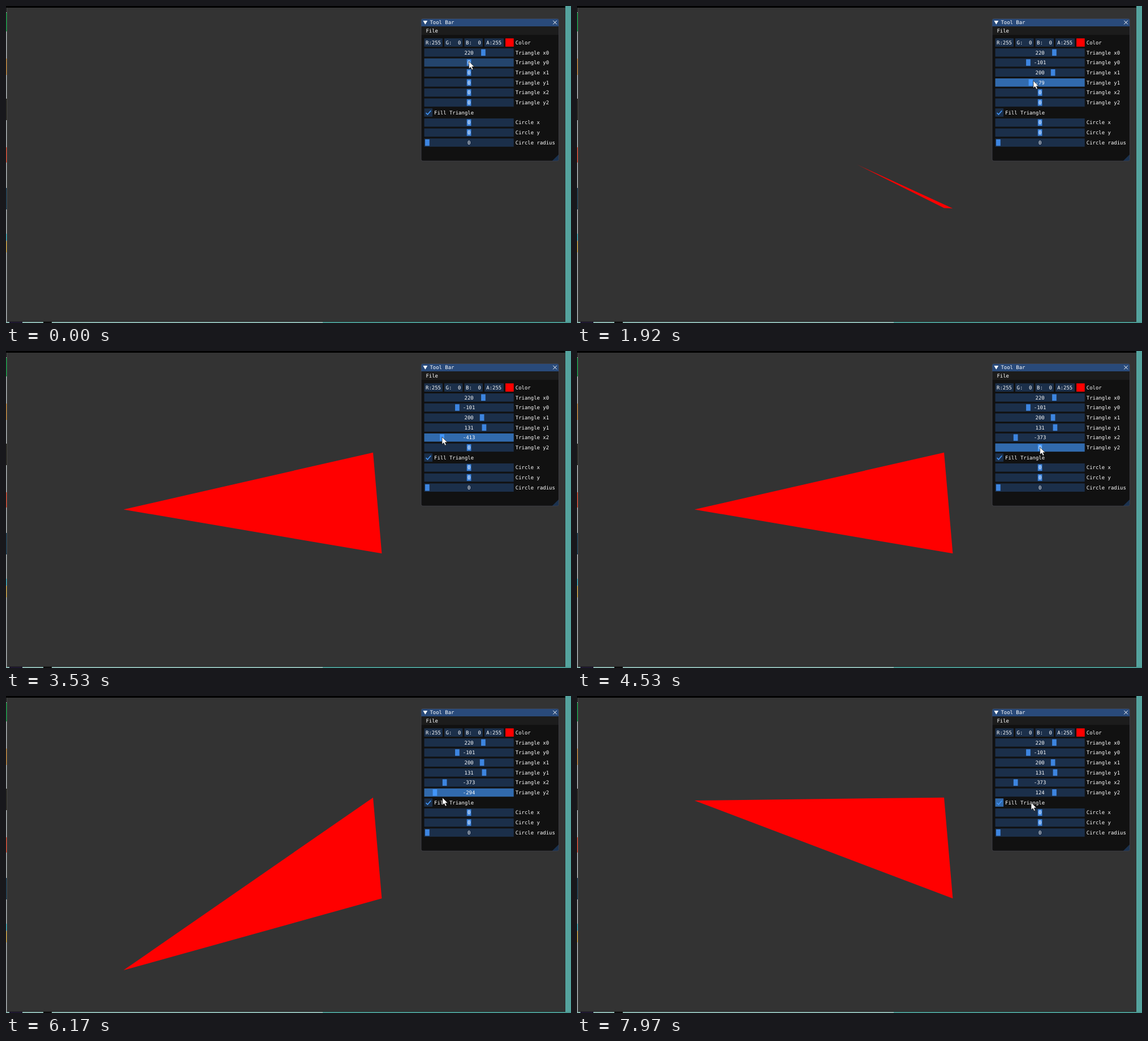
These frames come from a looping animation (999x561 px, 8000 ms). An HTML page:

```html
<!DOCTYPE html>
<html lang="en">
<head>
<meta charset="utf-8">
<title>Triangle tool bar</title>
<style>
  html, body { margin: 0; width: 100%; height: 100%; overflow: hidden; background: #333; }
  svg { display: block; width: 100%; height: 100%; }
  text {
    font: 8.96px "DejaVu Sans Mono", monospace;
    fill: #fff;
    white-space: pre;
    text-rendering: geometricPrecision;
  }
  .mid { text-anchor: middle; }
</style>
</head>
<body>
<svg id="stage" viewBox="0 0 999 561" preserveAspectRatio="none"></svg>
<script>
const LOOP = 8000, LAG = 30, UNIT = 0.77;
const CENTER = { x: 495, y: 280.5 };
const ROW = { left: 739.5, width: 158.2, height: 14.6, mid: 818.6, travel: 73.7 };
const COLOR = {
  idle: '#1b2f4a', hover: '#24456d', active: '#316aad',
  grab: '#3d85e0', grabActive: '#4296fa', red: '#ff0000'
};

// Pointer tracks: time, place
const TRACK_X = [
  [60, 818.6], [240, 797.9], [330, 797.9], [490, 818.6], [640, 818.6], [980, 836.2],
  [1040, 842.4], [1160, 841.6], [1290, 841.6], [1440, 818.6], [1500, 818.6],
  [1700, 786.3], [1800, 786.3], [1860, 797.9], [1920, 806.8], [2340, 845.4],
  [2590, 845.4], [2790, 818.6], [2900, 818.6], [3290, 790], [3470, 775.6], [3500, 771],
  [3850, 771], [3940, 775.6], [4100, 775.6], [4400, 818.6], [4710, 818.6],
  [5060, 850.1], [5290, 850.1], [5320, 842.3], [5350, 812], [5490, 800], [6080, 771],
  [6140, 757.9], [6170, 772], [6230, 757.8], [6260, 757.8], [6500, 815], [6660, 844],
  [7120, 844], [7400, 812], [7510, 800], [7820, 800], [7970, 803]
];
const TRACK_Y = [
  [0, 98], [330, 101], [490, 115], [1290, 117], [1440, 131], [2590, 134], [2790, 151],
  [4100, 153], [4400, 170], [5350, 172], [6140, 180], [7120, 177], [7400, 186], [7970, 188.5]
];

// Spans in which the moving picture stands still
const HOLDS = [[2270, 2340], [3350, 3530], [3530, 3620], [6690, 6870]];

// Press and release are the drag times
const SLIDERS = [
  { name: 'Triangle x0', max: 640, fixed: 220 },
  { name: 'Triangle y0', max: 360, press: 60, release: 330 },
  { name: 'Triangle x1', max: 640, press: 640, release: 1290 },
  { name: 'Triangle y1', max: 360, press: 1470, release: 2600 },
  { name: 'Triangle x2', max: 640, press: 2820, release: 4100 },
  { name: 'Triangle y2', max: 360, press: 4500, release: 7120 },
  { name: 'Circle x', max: 640, fixed: 0 },
  { name: 'Circle y', max: 360, fixed: 0 },
  { name: 'Circle radius', fixed: 0 }
];
const CHECK = { row: 7, press: 7820, release: LOOP };
SLIDERS.forEach((s, i) => s.row = i + (i < 6 ? 1 : 2));

const stage = document.getElementById('stage');

function add(tag, attrs, content) {
  const node = document.createElementNS('http://www.w3.org/2000/svg', tag);
  for (const key in attrs) node.setAttribute(key, attrs[key]);
  if (content !== undefined) node.textContent = content;
  stage.appendChild(node);
  return node;
}
const rect = (x, y, width, height, fill, more) => add('rect', { x, y, width, height, fill, ...more });
const shape = (d, fill, more) => add('path', { d, fill, ...more });
const label = (x, y, content) => add('text', { x, y }, content);
const centered = (x, y, content) => add('text', { x, y, class: 'mid' }, content);
const rowMid = row => 64.6 + 17.71 * row;

function drawDesktop() {
  rect(0, 0, 999, 561, '#55a39e');
  rect(0, 0, 2, 561, '#b4babd');
  const edge = (y, h, fill) => rect(0, y, 1.4, h, fill);
  edge(0, 11, '#111');
  edge(12, 33, '#00a33a');
  edge(93, 29, '#d08a30');
  edge(164, 38, '#14120a');
  edge(250, 27, '#ea4528');
  edge(322, 38, '#08304a');
  edge(403, 12, '#35bdd0');
  edge(416, 20, '#e2b03c');
  rect(0, 559, 999, 2, '#8fb9b3');
  rect(560, 559, 439, 2, '#4b9a93');
  rect(6, 559, 23, 2, '#1e1730');
  rect(66, 559, 15, 2, '#0c0c0c');
  rect(1.5, 0, 987.5, 559, '#222');
  rect(2, 3, 986.5, 555, '#333');
  rect(0, 0, 989, 3, '#000');
}

function drawPanel() {
  rect(734, 22.5, 243.5, 251.8, '#111', { rx: 3 });
  shape('M734 36V25.5Q734 22.5 737 22.5H974.5Q977.5 22.5 977.5 25.5V36Z', '#294a7a');
  rect(734, 36, 243.5, 15, '#1c1c1c');
  shape('M977.5 262.5V271.5Q977.5 274.3 974.5 274.3H965.5Z', '#1b324f');
  rect(734, 22.5, 243.5, 251.8, 'none', { rx: 3, stroke: '#45454c', 'stroke-width': 0.8 });
  shape('M737.4 26H745.2L741.3 32.8Z', '#fff');
  shape('M967.3 25.8L973.9 32.4M973.9 25.8L967.3 32.4', 'none', { stroke: '#fff', 'stroke-width': 1 });
  label(749.4, 32.4, 'Tool Bar');
  label(742.4, 47.2, 'File');

  const y = rowMid(0);
  ['R:255', 'G:  0', 'B:  0', 'A:255'].forEach((content, i) => {
    const x = ROW.left + 35.5 * i, w = i < 3 ? 32.4 : 34;
    rect(x, y - 7.3, w, ROW.height, COLOR.idle);
    centered(x + w / 2 - 0.2, y + 3.2, content);
  });
  rect(883.1, y - 7.3, 14.6, ROW.height, COLOR.red);
  label(900.8, y + 3.2, 'Color');
}

function drawRows() {
  for (const s of SLIDERS) {
    const y = rowMid(s.row);
    s.frame = rect(ROW.left, y - 7.3, ROW.width, ROW.height, COLOR.idle);
    s.grab = rect(0, y - 5.75, 7.7, 11.5, COLOR.grab);
    s.text = centered(ROW.mid, y + 3.2, '0');
    label(900.8, y + 3.2, s.name);
  }
  const y = rowMid(CHECK.row);
  CHECK.frame = rect(ROW.left, y - 7.3, 14.6, ROW.height, COLOR.idle);
  shape(`M742.6 ${y + 0.6}L745.4 ${y + 3.4}L751.3 ${y - 3.4}`, 'none',
    { stroke: COLOR.grabActive, 'stroke-width': 1.6 });
  label(757, y + 3.2, 'Fill Triangle');
}

function along(track, t) {
  let i = 1;
  while (i < track.length - 1 && track[i][0] < t) i++;
  const [t0, v0] = track[i - 1], [t1, v1] = track[i];
  const k = Math.min(1, Math.max(0, (t - t0) / (t1 - t0)));
  return v0 + (v1 - v0) * k;
}

function valueAt(s, t) {
  if (s.fixed !== undefined) return s.fixed;
  if (t < s.press) return 0;
  const x = along(TRACK_X, Math.min(t, s.release) - LAG);
  return Math.round((x - ROW.mid) / ROW.travel * s.max);
}

const isActive = (item, t) => t >= item.press && t < item.release;

function frameColor(item, t, tip, busy, right) {
  if (isActive(item, t)) return COLOR.active;
  const over = Math.abs(tip.y - rowMid(item.row)) < 7.3 && tip.x > ROW.left && tip.x < right;
  return over && !busy ? COLOR.hover : COLOR.idle;
}

drawDesktop();
const triangle = add('polygon', { fill: COLOR.red });
drawPanel();
drawRows();
const cursor = shape('M0 0V13L3 10.3L5.2 15L7.4 14L5.3 9.5H9.4Z', '#fff',
  { stroke: '#111', 'stroke-width': 0.7 });

function render(time) {
  const hold = HOLDS.find(([from, to]) => time >= from && time < to);
  const t = hold ? hold[0] : time;
  const tip = { x: along(TRACK_X, t), y: along(TRACK_Y, t) };
  const busy = [...SLIDERS, CHECK].some(item => isActive(item, t));

  for (const s of SLIDERS) {
    const value = valueAt(s, t);
    const x = s.max ? ROW.mid + value / s.max * ROW.travel : ROW.mid - ROW.travel;
    s.grab.setAttribute('x', x - 3.85);
    s.grab.setAttribute('fill', isActive(s, t) ? COLOR.grabActive : COLOR.grab);
    s.frame.setAttribute('fill', frameColor(s, t, tip, busy, ROW.left + ROW.width));
    s.text.textContent = value;
  }
  CHECK.frame.setAttribute('fill', frameColor(CHECK, t, tip, busy, 828));

  const [x0, y0, x1, y1, x2, y2] = SLIDERS.slice(0, 6).map(s => valueAt(s, t - LAG));
  triangle.setAttribute('points', [[x0, y0], [x1, y1], [x2, y2]]
    .map(([x, y]) => `${CENTER.x + x * UNIT},${CENTER.y - y * UNIT}`).join(' '));
  cursor.setAttribute('transform', `translate(${tip.x} ${tip.y})`);
}

const start = performance.now();
function tick() {
  render((performance.now() - start) % LOOP);
  requestAnimationFrame(tick);
}
tick();
</script>
</body>
</html>
```
